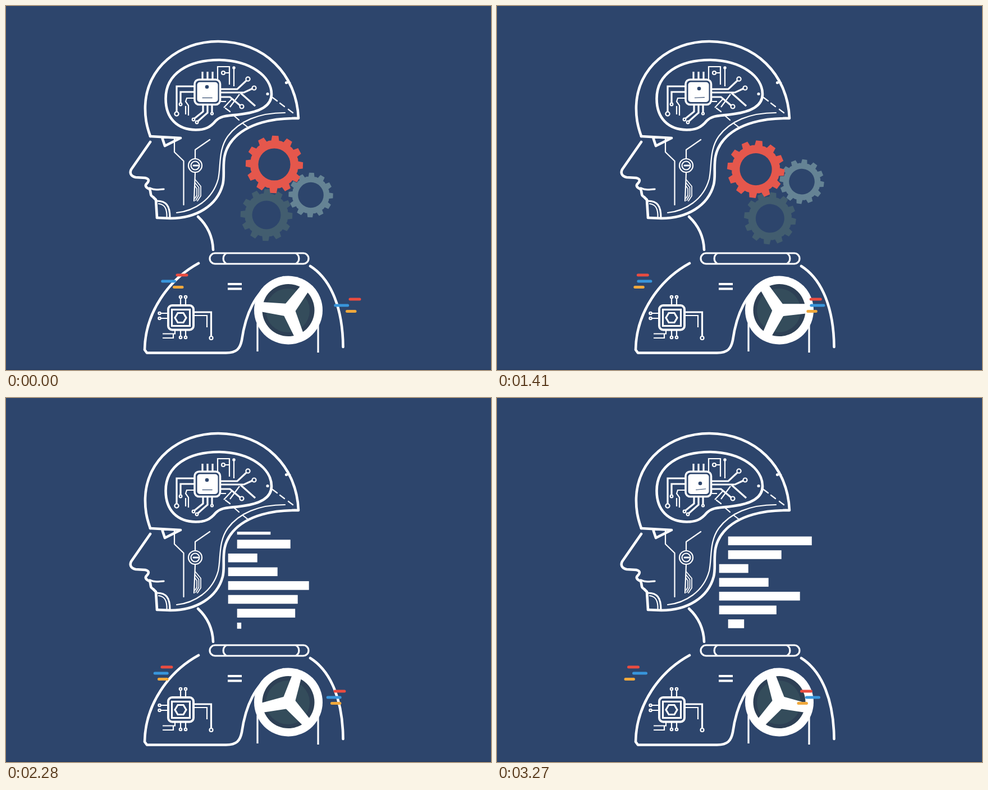
Animation of 864x648 px, one loop 3300 ms. Source, as an HTML page:

```html
<!DOCTYPE html>
<html lang="en">
<head>
<meta charset="utf-8">
<title>Machine mind</title>
<style>
html, body { margin: 0; width: 100%; height: 100%; overflow: hidden; background: #2d456c; }
svg { display: block; width: 100vw; height: 100vh; }
.line { fill: none; stroke: #fff; stroke-linecap: round; stroke-linejoin: round; }
.bold { stroke-width: 4.6; }
.mid { stroke-width: 3.2; }
.thin { stroke-width: 2.2; }
.flat { stroke-linecap: butt; stroke-linejoin: miter; }
.fill { fill: #fff; }
.dash line { stroke-width: 5; stroke-linecap: round; }
</style>
</head>
<body>
<svg viewBox="0 0 864 648">
  <defs>
    <clipPath id="page"><rect x="390" y="238" width="180" height="172.8"/></clipPath>
    <g id="dashes" class="dash">
      <line class="far" x1="230.5" x2="247.5" y1="479" y2="479" stroke="#ea4c40"/>
      <line class="near" x1="241.5" x2="263.5" y1="490" y2="490" stroke="#3896dc"/>
      <line class="far" x1="225" x2="239.5" y1="500.6" y2="500.6" stroke="#f0a83c"/>
    </g>
  </defs>
  <rect width="864" height="648" fill="#2d456c"/>
  <rect y="646.5" width="864" height="1.5" fill="#273c60"/>

  <!-- head -->
  <g class="line bold">
    <path d="M257 232C250 212 247.500 198 248 178C250 110 308 63 378 63C460 63 518 122 521 200C478 199 430 208 404 238C379 267 392 295 386 318C376 356 338 378 293 378L269 377"/>
    <path d="M257 232L311 235L283 249L278 234M257 242L223 291C220 297 222 303 231 305L248 306C256 308 255 312 250 317C247 320 250 324 256 326C259 334 256 337 262 340L267 345L269 377"/>
    <path d="M284.500 165C284.500 120 325 96 380 96C435 97 473 125 473 157C473 180 448 189 420 192.500C395 196 385 194 374 204C364 216 355 220.500 338 220.500C305 220 284.500 200 284.500 165Z"/>
    <path d="M342 375C357 389 368 407 369 434"/>
  </g>
  <g class="line thin">
    <path d="M497 190C450 190 415 205 395 232C378 256 383 285 378 308C368 345 335 365 304 368"/>
    <path d="M475 163L483 169M488 173L496 179M503 184L511 190M391 182L399 188M407 196L415 203M422 209L431 216"/>
    <path class="mid" d="M256 324C264 328 272 327 281 326M269 347C285 347 292 355 292 377"/>
    <path d="M272 352C283 353 287 361 286.500 376"/>
    <path d="M300 236V260L316.500 276V354M337 272V256L363 238M337 296L335 347"/>
    <path d="M337 309L347 321V338L341 347M337 315L343.500 323V337L338 346M337 321L340 325V337L337 342" stroke-width="1.7"/>
    <circle cx="337" cy="284" r="12"/><circle cx="337" cy="284" r="7.500"/>
    <path d="M334 284H342" stroke-width="3"/>
  </g>
  <g class="fill">
    <circle cx="466" cy="156.500" r="2.600"/><circle cx="499.500" cy="136.500" r="2.600"/>
    <circle cx="506.500" cy="136.500" r="1"/><circle cx="406" cy="110" r="2.700"/>
  </g>

  <!-- brain circuit -->
  <g class="line mid flat">
    <path d="M350 117V131M359 117V131M368 117V131M335 143H304V188M335 153H311V172"/>
    <path d="M383 148H412L428 133M383 154H424L439 147M383 162H399L417 177M418 155L444 178"/>
    <path d="M351 177V188L336 200M359 177V190L342 205M367 177V189"/>
  </g>
  <g class="line thin flat">
    <path d="M335 164H322L320 170L325 177V195M320 178V193M377 131V108H398V140M406 112V143M391 119H398"/>
    <path d="M399 180L416 157M388 181L402 166M383 170H392"/>
    <circle cx="304" cy="192" r="3.600"/><circle cx="311" cy="175" r="2.300"/>
    <circle cx="387" cy="119" r="3"/><circle cx="431" cy="130" r="3.600"/>
    <circle cx="442" cy="146" r="3.500"/><circle cx="420" cy="179" r="3.500"/>
    <circle cx="334" cy="202" r="2.300"/><circle cx="340" cy="207" r="2.300"/><circle cx="367" cy="191.500" r="2"/>
  </g>
  <rect x="336" y="131" width="45.500" height="44.500" rx="8" fill="#2d456c" stroke="#fff" stroke-width="3.600"/>
  <rect class="fill" x="340.500" y="135.500" width="37" height="35.500" rx="5"/>
  <circle id="eye" r="3.300" fill="#2d456c"/>
  <line id="mouth" x2="18" stroke="#2d456c" stroke-width="1.200"/>

  <!-- body -->
  <g class="line bold">
    <path d="M343 458C290 487 248 545 247 612L251 617.500H392C411 617.500 417 610 420 595C425 560 440 500 495 483M542 463C580 487 600 540 600.500 607"/>
    <rect class="mid" x="363" y="440" width="176" height="19" rx="9.500"/>
    <path class="mid" d="M392 440.500C385.500 445 385.500 454 392 458.500M517 440.500C523.500 445 523.500 454 517 458.500"/>
    <path class="mid flat" d="M448 565V615M556 565V617"/>
    <path class="flat" stroke-width="4" d="M395 495H420M395 503.500H420"/>
  </g>
  <g class="line mid flat">
    <rect x="289" y="533" width="45" height="43.500" rx="7" stroke-width="4"/>
    <rect x="295.500" y="540.500" width="32" height="29"/>
    <path d="M301 555L306 546.500H316L321 555L316 563.500H306Z"/>
    <path d="M335 545H365.500V588"/>
  </g>
  <g class="line thin flat">
    <path d="M311 521V533M320 521V533M311 577V588M320 577V588M276 547H288M276 556H288M335 551H358V572M301 577V583.500H279M298 584V591H279"/>
    <circle cx="311" cy="518" r="2.200"/><circle cx="320" cy="518" r="2.200"/>
    <circle cx="311" cy="590" r="2.200"/><circle cx="320" cy="590" r="2.200"/>
    <circle cx="273.500" cy="547" r="2.200"/><circle cx="273.500" cy="556" r="2.200"/>
    <circle cx="365.500" cy="591" r="3"/>
  </g>

  <circle class="fill" cx="503" cy="541.500" r="61"/>
  <circle cx="503" cy="541.500" r="46.500" fill="#2d3f54"/>
  <circle cx="502" cy="542" r="39" fill="#344c5b"/>
  <g id="wheel" class="fill"></g>

  <g id="gears"></g>
  <g id="code" class="fill" clip-path="url(#page)"></g>
  <use href="#dashes"/>
  <use href="#dashes" x="308" y="43"/>
</svg>
<script>
const STEP = 30, FRAMES = 110;
const $ = id => document.getElementById(id);
const clamp = v => Math.min(1, Math.max(0, v));
const smooth = v => (v = clamp(v)) * v * (3 - 2 * v);
const quad = v => v < .5 ? 2 * v * v : 1 - 2 * (1 - v) * (1 - v);
const move = (el, value) => el.setAttribute('transform', value);

function add(parent, tag, attrs) {
  const el = document.createElementNS('http://www.w3.org/2000/svg', tag);
  for (const k in attrs) el.setAttribute(k, attrs[k]);
  return parent.appendChild(el);
}

function gear(x, y, outer, body, hole, color, dir) {
  const pts = [];
  const at = (r, a) => pts.push((r * Math.cos(a)).toFixed(2) + ' ' + (r * Math.sin(a)).toFixed(2));
  for (let i = 0; i < 12; i++) {
    const a = (i * 30 + 2) * Math.PI / 180;
    at(body, a - .165); at(outer, a - .11); at(outer, a + .11); at(body, a + .165);
    at(body + .5, a + .26);
  }
  const ring = `M${-hole} 0a${hole} ${hole} 0 1 0 ${2 * hole} 0a${hole} ${hole} 0 1 0 ${-2 * hole} 0Z`;
  const el = add($('gears'), 'path', { d: 'M' + pts.join('L') + 'Z' + ring, fill: color, 'fill-rule': 'evenodd' });
  return { el, x, y, dir };
}
const gears = [
  gear(464, 372, 46.5, 38.5, 25.5, '#425d6f', -1),
  gear(543, 336.5, 39.8, 33, 22.8, '#658394', -1),
  gear(478, 282, 51.3, 42.8, 28.6, '#e5574c', 1)
];

for (const a of [0, 120, 240])
  add($('wheel'), 'path', { d: 'M-2 -11.500L49 -8.500V8.500L-2 11.500Z', transform: `rotate(${a})` });

// indent and width of each code row, repeating
const ROWS = [[0, 52], [0, 88], [0, 144], [0, 124], [16, 151], [16, 95]];
const bars = Array.from({ length: 10 }, () => add($('code'), 'rect', { height: 15.6 }));

// frame, x, y of the chip's dot
const EYE = [[0, 358, 144], [14, 360, 149], [22, 358, 146], [31, 354, 154], [40, 358, 144], [47, 360, 147],
  [58, 358, 145], [67, 362, 152], [76, 358, 146], [86, 354, 153], [98, 358, 144], [109, 362, 152]];

function drawEye(n) {
  let i = 0;
  while (i < EYE.length - 2 && EYE[i + 1][0] <= n) i++;
  const [n0, x0, y0] = EYE[i], [n1, x1, y1] = EYE[i + 1];
  const k = smooth((n - n0) / (n1 - n0));
  const x = x0 + (x1 - x0) * k, y = y0 + (y1 - y0) * k;
  move($('eye'), `translate(${x} ${y})`);
  move($('mouth'), `translate(${345 + (x - 354) * 1.15} 163.500) rotate(${(358 - x) * 1.4})`);
}

function drawGears(n) {
  const w = 2 * Math.PI * n / 52;
  const swing = 23.1 * (Math.cos(w) - 1) + 36.7 * Math.sin(w);
  move($('gears'), `rotate(${swing} 489 324.500)`);
  for (const g of gears) move(g.el, `translate(${g.x} ${g.y}) rotate(${g.dir * 8.93 * n})`);
}

function drawWheel(n) {
  const turn = 67 + 6.03 * n + 4 * (1 - Math.cos(Math.PI * n / 10));
  move($('wheel'), `translate(503 541.500) rotate(${turn})`);
}

function drawCode(n) {
  const pos = 3 + .1586 * (n - 67), first = Math.floor(pos) - 1;
  bars.forEach((bar, j) => {
    const i = first + j, [indent, width] = ROWS[(i + 12) % 6];
    const grow = smooth((pos + 7 - i - .05) / 2.2);
    const left = 1 - smooth((.44 - (i - pos)) / 1.52);
    bar.setAttribute('x', 395.7 + indent);
    bar.setAttribute('y', 238.2 + (i - pos) * 24.6);
    bar.setAttribute('width', width * grow * left);
  });
}

function drawDashes(n) {
  const d = Math.abs(((n - .55) % 20 + 20) % 20 - 10);
  const u = quad(clamp(d / 9.5));
  document.querySelectorAll('.far').forEach(el => move(el, `translate(${74.5 * u})`));
  document.querySelectorAll('.near').forEach(el => move(el, `translate(${37.2 * u})`));
}

function draw(n) {
  const isCode = n >= FRAMES / 2;
  $('gears').style.display = isCode ? 'none' : '';
  $('code').style.display = isCode ? '' : 'none';
  if (isCode) drawCode(n); else drawGears(n);
  drawWheel(n);
  drawEye(n);
  drawDashes(n);
}

const start = performance.now();
function tick() {
  draw(Math.floor((performance.now() - start + 2) / STEP) % FRAMES);
  requestAnimationFrame(tick);
}
tick();
</script>
</body>
</html>
```
